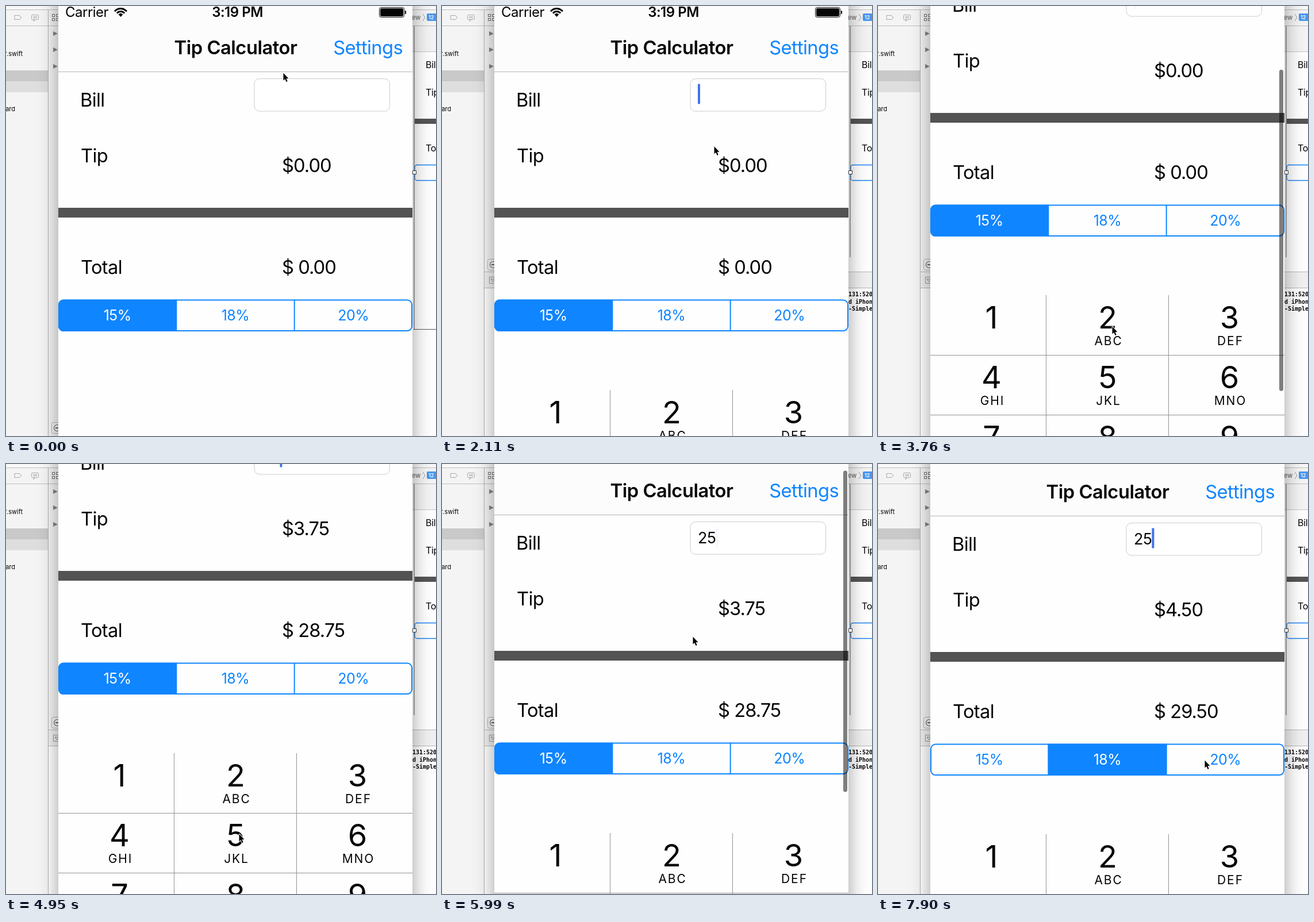
Write an HTML page with a canvas that moves like this. It is 748 px wide and 748 px high and loops after 8000 ms.

```html
<!DOCTYPE html>
<html lang="en">
<head>
<meta charset="utf-8">
<title>Tip Calculator</title>
<style>
html, body { margin: 0; width: 100%; height: 100%; overflow: hidden; }
canvas { display: block; }
</style>
</head>
<body>
<canvas id="stage" width="748" height="748"></canvas>
<script>
const ctx = document.getElementById('stage').getContext('2d');
const LOOP = 8000, TICK = 149;          // the screen updates once per tick
const LEFT = 91, WIDTH = 616, RIGHT = LEFT + WIDTH;
const BLUE = '#0f85ff', BLACK = '#050505', WHITE = '#fefefe';
const RATES = [15, 18, 20];

// Eased progress from 0 to 1 between two ticks
function ease(tick, start, end) {
  const u = Math.min(1, Math.max(0, (tick - start) / (end - start)));
  return u * u * (3 - 2 * u);
}

function pointerAt(tick) {
  const moves = [               // start tick, end tick, destination
    [0, 1, 486, 88],
    [1, 4, 500, 157],           // bill field
    [13, 16, 396, 492],
    [21, 25, 407, 557],         // key 2
    [29, 31, 405, 643],         // key 5
    [34, 37, 436, 300],
    [41, 45, 402, 540],         // 18%
    [49, 53, 568, 515]
  ];
  let x = 482, y = 116;
  for (const [start, end, toX, toY] of moves) {
    const u = ease(tick, start, end);
    x += (toX - x) * u;
    y += (toY - y) * u;
  }
  return [x, y];
}

function caretAlpha(tick) {
  if (tick < 6) return 0;
  const start = tick < 29 ? 6.7 : tick < 35 ? 29 : 35;   // typing restarts the blink
  return (tick - start) / 6.8 % 1 < 0.68 ? 1 : 0.05;
}

function stateAt(tick) {
  return {
    consoleOpen: tick >= 8,
    scroll: Math.round(165 * ease(tick, 15.9, 23) - 141 * ease(tick, 36, 40.3)),
    scrollbar: tick >= 16 && tick < 26 || tick >= 36 && tick < 46,
    keypadDrop: 240 * (1 - ease(tick, 6, 9.9)),
    pressed: tick === 28 ? 2 : tick === 31 ? 5 : 0,
    bill: '25'.slice(0, (tick >= 29) + (tick >= 32)),
    selected: tick < 47 ? 0 : 1,
    caretAlpha: caretAlpha(tick)
  };
}

function rect(x, y, w, h, color) {
  ctx.fillStyle = color;
  ctx.fillRect(x, y, w, h);
}

function trace(points) {
  ctx.beginPath();
  points.forEach(([x, y]) => ctx.lineTo(x, y));
}

function line(color, width, ...points) {
  trace(points);
  ctx.strokeStyle = color;
  ctx.lineWidth = width;
  ctx.stroke();
}

function shape(color, ...points) {
  trace(points);
  ctx.fillStyle = color;
  ctx.fill();
}

function box(x, y, w, h, radius, { stroke, width = 1, fill }) {
  ctx.beginPath();
  ctx.roundRect(x, y, w, h, radius);
  if (fill) { ctx.fillStyle = fill; ctx.fill(); }
  if (stroke) { ctx.strokeStyle = stroke; ctx.lineWidth = width; ctx.stroke(); }
}

function arc(x, y, radius, from, to, color, width) {
  ctx.beginPath();
  ctx.arc(x, y, radius, from, to);
  ctx.strokeStyle = color;
  ctx.lineWidth = width;
  ctx.stroke();
}

function text(str, x, y, size, { color = BLACK, weight = 400, align = 'left', tracking = -0.02,
    family = 'Inter, sans-serif' } = {}) {
  ctx.font = `${weight} ${size}px ${family}`;
  ctx.letterSpacing = `${size * tracking}px`;
  ctx.textAlign = align;
  ctx.fillStyle = color;
  ctx.fillText(str, x, y);
  return ctx.measureText(str).width;
}

function drawToolbarIcons() {
  const grey = '#a9a9a9';
  line(grey, 1, [15, 16.5], [23, 16.5], [27, 20], [23, 23.5], [15, 23.5], [15, 16]);
  box(44.5, 15.5, 12, 8, 1, { stroke: grey });
  for (const y of [18.5, 20.5]) line(grey, 1, [47, y], [54, y]);
  line(grey, 1, [48, 24], [48, 27], [51, 24]);
  for (const x of [80.5, 87.5])
    for (const y of [14.5, 21.5]) box(x, y, 4, 4, 0, { stroke: '#666' });
}

function drawRoundButton(y) {
  box(79.5, y - 9.5, 20, 19, 3, { stroke: '#b5b5b5' });
  arc(89, y, 5.5, 0, 7, '#666', 1.2);
  rect(86, y - 1, 6, 2, '#666');
}

function drawNavigator() {
  drawToolbarIcons();
  rect(0, 112, 73, 19, '#c9c9c9');
  rect(0, 131, 73, 19, '#dedede');
  text('r.swift', 29, 87, 11, { align: 'right', tracking: 0 });
  text('ard', 16, 183, 11, { align: 'right', tracking: 0 });
  rect(73, 7, 1, 741, '#b0b0b0');
  for (const y of [48, 76, 105]) shape('#858585', [82, y - 4], [90, y], [82, y + 4]);
}

function drawStoryboard(consoleOpen) {
  text('ew', 706, 24, 11, { color: '#555', tracking: 0 });
  line('#999', 1, [725, 14], [729, 20], [725, 26]);
  box(732, 13, 18, 13, 2, { fill: '#4a97ef' });
  text('12', 735, 23, 9, { color: '#fff', weight: 600, tracking: 0 });
  rect(RIGHT, 35, 41, 713, WHITE);
  rect(RIGHT, 35, 41, 44, '#f3f3f3');
  rect(RIGHT, 79, 41, 1, '#c4c4c4');
  text('Bill', 730, 108, 16);
  text('Tip', 730, 156, 16);
  text('Total', 730, 253, 16);
  rect(711, 196, 37, 9, '#555');
  box(711, 276.5, 60, 27, 4, { stroke: '#1681f5', width: 1.3 });
  rect(709.5, 35, 1, consoleOpen ? 402 : 528, '#555');
  if (!consoleOpen) rect(709, 562, 39, 1, '#555');
}

function drawConsole() {
  rect(74, 463, 674, 27, '#f0f0f0');
  rect(74, 491, 674, 257, WHITE);
  for (const y of [462, 490]) rect(74, y, 674, 1, '#b5b5b5');
  box(82.5, 471.5, 12, 11, 0, { stroke: '#999' });
  line('#888', 1, [85, 475], [92, 475], [88.5, 480], [85, 475]);
  ['131:520', 'd iPhone', '-SimpleT'].forEach((row, i) =>
    text(row, RIGHT, 505 + i * 12.5, 10,
      { weight: 700, tracking: 0, family: '"DejaVu Sans Mono", monospace' }));
}

function drawEditor(consoleOpen) {
  rect(0, 0, 748, 748, '#f4f4f4');
  rect(0, 0, 748, 6, '#f8f8f8');
  for (const y of [6, 34]) rect(0, y, 748, 1, '#bcbcbc');
  drawNavigator();
  drawStoryboard(consoleOpen);
  drawRoundButton(consoleOpen ? 450 : 734);
  if (consoleOpen) drawConsole();
}

function drawStatusBar() {
  text('Carrier', 103, 19, 24);
  text('3:19 PM', 402.5, 19, 24, { weight: 600, align: 'center' });
  for (const r of [13.5, 8.5])
    arc(199.5, 18, r, -Math.PI * 0.78, -Math.PI * 0.22, BLACK, 3);
  shape(BLACK, [199.5, 19], [195.5, 14.5], [199.5, 12.5], [203.5, 14.5]);
  box(649.5, 2.5, 43, 17, 3, { stroke: BLACK });
  box(651, 4, 40, 14, 2, { fill: BLACK });
  box(694, 8, 2, 6, 1, { fill: BLACK });
}

function drawBillField(bill, alpha) {
  box(432, 126.5, 235.5, 56.5, 9, { stroke: '#ccc', fill: '#fff' });
  const width = text(bill, 445, 164, 27);
  ctx.globalAlpha = alpha;
  box(445 + width, 135.5, 4, 35, 1, { fill: '#4272ec' });
  ctx.globalAlpha = 1;
}

function drawSegments(selected) {
  const top = 510.5, height = 55.6, step = WIDTH / 3;
  ctx.save();
  ctx.beginPath();
  ctx.roundRect(LEFT, top, WIDTH, height, 9);
  ctx.clip();
  RATES.forEach((rate, i) => {
    const x = LEFT + i * step, on = i === selected;
    if (on) rect(x, top, step, height, BLUE);
    if (i) rect(x - 1, top, 2, height, BLUE);
    text(rate + '%', x + step / 2, 547, 25, { color: on ? '#fff' : BLUE, align: 'center' });
  });
  ctx.restore();
  box(LEFT + 1, top + 1, WIDTH - 2, height - 2, 8, { stroke: BLUE, width: 2 });
}

function drawKeypad(drop, pressed) {
  const top = 668 + drop, row = 104, step = 213;
  const centers = [197, 399, 611];
  const letters = ['', 'ABC', 'DEF', 'GHI', 'JKL', 'MNO', 'PQRS', 'TUV', 'WXYZ'];
  rect(LEFT, top, WIDTH, row * 4, WHITE);
  letters.forEach((label, i) => {
    const col = i % 3, y = top + Math.floor(i / 3) * row;
    if (i + 1 === pressed) rect(292 + (col - 1) * step, y, step, row, '#d2d5db');
    text(i + 1, centers[col], y + 57.5, 54, { align: 'center' });
    text(label, centers[col] + 2, y + 86.5, 21, { align: 'center', tracking: 0.09 });
  });
  for (const x of [292, 505]) rect(x, top, 1, row * 4, '#929292');
  for (let i = 1; i < 4; i++) rect(LEFT, top + i * row, WIDTH, 1, '#929292');
}

function drawPhone(state) {
  ctx.save();
  ctx.shadowColor = 'rgba(0,0,0,.38)';
  ctx.shadowBlur = 32;
  rect(LEFT, -80, WIDTH, 940, WHITE);
  ctx.restore();

  ctx.save();
  ctx.beginPath();
  ctx.rect(LEFT, 0, WIDTH, 748);
  ctx.clip();
  ctx.translate(0, -state.scroll);
  rect(LEFT, 0, WIDTH, 114, '#fcfcfc');
  rect(LEFT, 114, WIDTH, 1, '#b4b4b4');
  drawStatusBar();
  const size = 32.7;
  text('Tip Calculator', 399.5, 84, size, { weight: 600, align: 'center', tracking: -0.015 });
  text('Settings', 690, 84, size, { color: BLUE, align: 'right' });

  text('Bill', 129, 175, size);
  text('Tip', 130, 271.5, size);
  text('Total', 130, 466, size);
  drawBillField(state.bill, state.caretAlpha);
  const tip = state.bill * RATES[state.selected] / 100;
  text('$' + tip.toFixed(2), 480, 289, size, { tracking: -0.03 });
  text('$ ' + (+state.bill + tip).toFixed(2), 480, 466, size, { tracking: -0.03 });
  rect(LEFT, 351, WIDTH, 17, '#535353');
  drawSegments(state.selected);
  drawKeypad(state.keypadDrop, state.pressed);
  ctx.restore();

  if (state.scrollbar)
    box(698, state.scroll * 0.714 - 7, 7, 559, 3.5, { fill: 'rgba(0,0,0,.5)' });
}

function drawPointer(x, y) {
  ctx.save();
  ctx.translate(x, y);
  const arrow = [[0.5, 0.5], [0.5, 13.5], [3.4, 10.9], [5.6, 16], [7.7, 15.1], [5.5, 10.2], [9.4, 10]];
  line('#fff', 2, ...arrow, arrow[0]);
  shape('#000', ...arrow);
  ctx.restore();
}

function draw(ms) {
  const tick = Math.floor(ms % LOOP / TICK);
  const state = stateAt(tick);
  drawEditor(state.consoleOpen);
  drawPhone(state);
  box(707.5, 286.5, 6, 6, 0, { stroke: '#333', fill: '#fff' });
  drawPointer(...pointerAt(tick));
}

ctx.lineJoin = 'round';
const began = performance.now();
function loop() {
  draw(performance.now() - began);
  requestAnimationFrame(loop);
}
loop();
</script>
</body>
</html>
```
